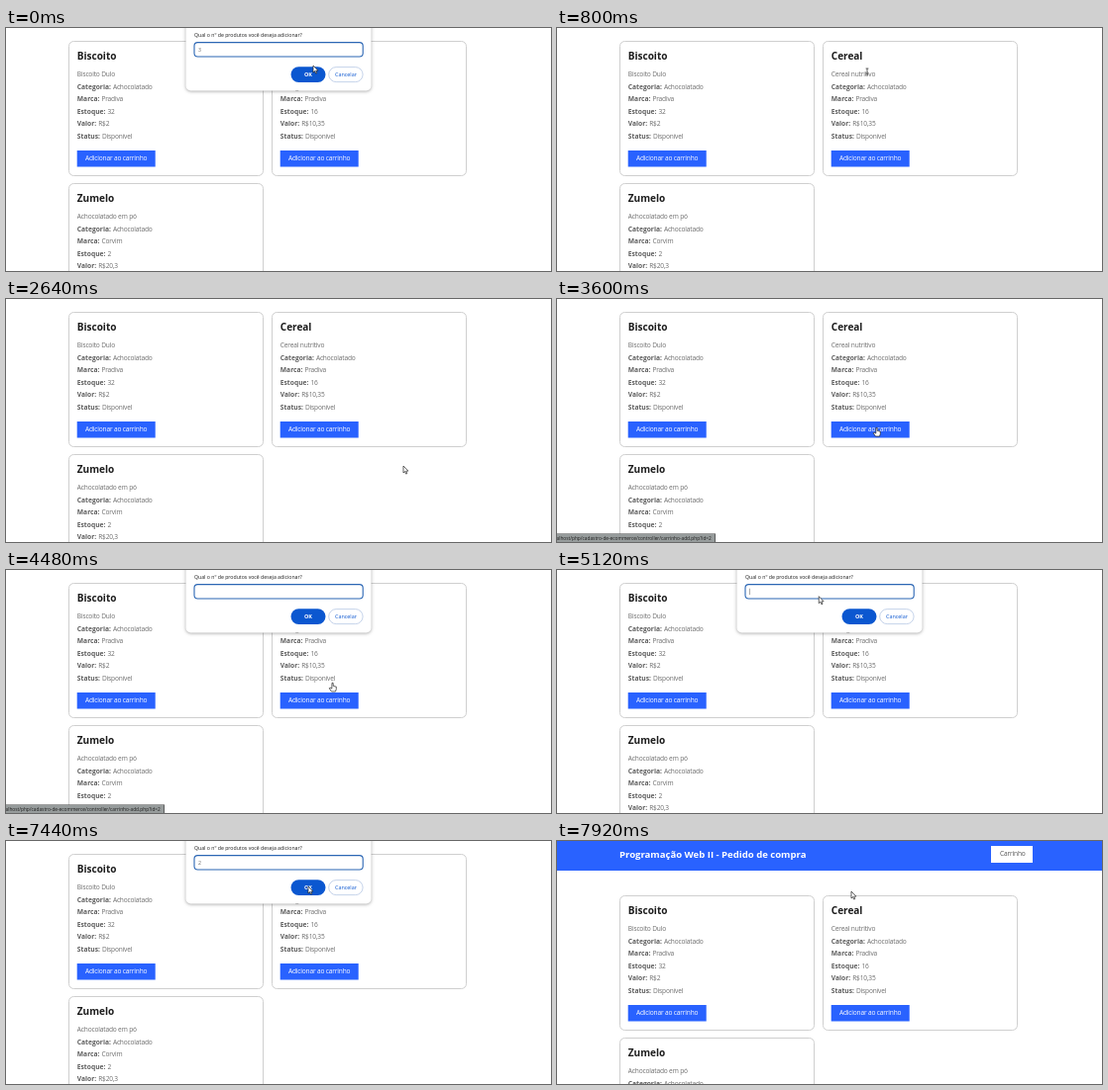
Animation, 550 px wide and 246 px high, one loop 8 s. Source, as an HTML page with a canvas:

```html
<!DOCTYPE html>
<html lang="pt-BR">
<head>
<meta charset="utf-8">
<title>Pedido de compra</title>
<style>
html, body { margin: 0; width: 100%; height: 100%; overflow: hidden; background: #fff; }
canvas { display: block; width: 550px; height: 246px; }
</style>
</head>
<body>
<canvas id="stage"></canvas>
<script>
const W = 550, H = 246, LOOP = 8000;
const BLUE = '#2962ff', ACCENT = '#0b57d0';
const SANS = '"Open Sans", "Noto Sans", sans-serif';
const canvas = document.getElementById('stage');
const ctx = canvas.getContext('2d');
const dpr = window.devicePixelRatio || 1;
canvas.width = W * dpr;
canvas.height = H * dpr;

const products = [
  { x: 63.5, y: 55.5, name: 'Biscoito', info: 'Biscoito Dulo', brand: 'Pradiva', stock: 32, price: 'R$2' },
  { x: 268.5, y: 55.5, name: 'Cereal', info: 'Cereal nutritivo', brand: 'Pradiva', stock: 16, price: 'R$10,35' },
  { x: 63.5, y: 199.5, name: 'Zumelo', info: 'Achocolatado em pó', brand: 'Corvim', stock: 2, price: 'R$20,3' }
];

// time, x, y, pointer shape from this time on
const path = [
  [0, 310, 38, 'arrow'], [170, 310, 38, 'beam'], [700, 313, 44, 'beam'],
  [960, 313, 44, 'arrow'], [1700, 439, 34.5, 'arrow'], [2000, 439, 34.5, 'arrow'],
  [2560, 401, 169, 'arrow'], [2720, 401, 169, 'arrow'], [3060, 334, 138, 'hand'],
  [3400, 322, 130, 'hand'], [3900, 322, 130, 'hand'], [4300, 329, 114, 'hand'],
  [4680, 329, 114, 'arrow'], [5160, 263, 25, 'beam'], [7040, 263, 25, 'arrow'],
  [7400, 305, 46, 'arrow'], [7640, 305, 46, 'arrow'], [7880, 297, 51, 'arrow']
];

function ramp(t, a, b) {
  const p = Math.min(1, Math.max(0, (t - a) / (b - a)));
  return p * p * (3 - 2 * p);
}

function scrollAt(t) {
  if (t < 160) return 42;
  if (t >= 7640) return 0;
  return 42 * (ramp(t, 460, 620) - ramp(t, 1790, 1910) + ramp(t, 2250, 2410));
}

function pointerAt(t) {
  let i = path.length - 1;
  while (path[i][0] > t) i--;
  const a = path[i], b = path[i + 1] || a;
  const k = a === b ? 0 : ramp(t, a[0], b[0]);
  return { x: a[1] + (b[1] - a[1]) * k, y: a[2] + (b[2] - a[2]) * k, shape: a[3] };
}

function text(s, x, y, size, color, { bold = false, align = 'left', gap = 0 } = {}) {
  ctx.font = `${bold ? 700 : 400} ${size}px ${SANS}`;
  ctx.letterSpacing = gap + 'px';
  ctx.textAlign = align;
  ctx.fillStyle = color;
  ctx.fillText(s, x, y);
  return ctx.measureText(s).width;
}

const body = (s, x, y, color = '#6c6c6c') => text(s, x, y, 6.6, color, { gap: -0.17 });

function rect(x, y, w, h, color) {
  ctx.fillStyle = color;
  ctx.fillRect(x, y, w, h);
}

function round(x, y, w, h, r, fill, stroke, line = 1) {
  ctx.beginPath();
  ctx.roundRect(x, y, w, h, r);
  if (fill) { ctx.fillStyle = fill; ctx.fill(); }
  if (stroke) { ctx.strokeStyle = stroke; ctx.lineWidth = line; ctx.stroke(); }
}

function drawCard(p) {
  const x = p.x + 8.3, y = p.y;
  round(p.x, y, 196, 136, 5, '#fff', '#cacaca', 0.9);
  text(p.name, x, y + 18.7, 10, '#1c1c1c', { bold: true });
  body(p.info, x, y + 35.9);
  const rows = [
    ['Categoria:', 'Achocolatado'], ['Marca:', p.brand], ['Estoque:', p.stock],
    ['Valor:', p.price], ['Status:', 'Disponível']
  ];
  rows.forEach(([label, value], i) => {
    const by = y + 48.4 + i * 12.5;
    const w = text(label, x, by, 6.7, '#5e5e5e', { bold: true });
    body(String(value), x + w + 2, by);
  });
  rect(p.x + 8.2, y + 110.5, 79, 16.5, BLUE);
  body('Adicionar ao carrinho', x + 8.1, y + 120.5, '#fff');
}

function drawPage(scroll) {
  rect(0, 0, W, H, '#fff');
  ctx.save();
  ctx.translate(0, -scroll);
  rect(0, 0, W, 30, BLUE);
  text('Programação Web II - Pedido de compra', 63, 17, 9.55, '#fff', { bold: true });
  rect(438, 5, 42, 17, '#fff');
  body('Carrinho', 447, 15.4, '#555');
  products.forEach(drawCard);
  ctx.restore();
}

function drawDialog(t, value) {
  ctx.save();
  ctx.shadowColor = 'rgba(0,0,0,0.36)';
  ctx.shadowBlur = 3.5 * dpr;
  ctx.shadowOffsetY = 0.8 * dpr;
  round(181.5, -10, 187, 73.5, 5, '#fff');
  ctx.restore();
  text('Qual o nº de produtos você deseja adicionar?', 190, 9, 5.2, '#1c1c1c');
  round(190, 14.6, 170.2, 14.4, 3.5, '#fff', '#2b66b4', 1.1);
  if (value) text(value, 194, 23.9, 5.2, '#666');
  else if ((t + 360) % 1060 < 530) rect(194.3, 18.7, 0.5, 6.4, '#555');
  round(287.5, 39.2, 35, 15.8, 7.9, ACCENT);
  text('OK', 305, 49.1, 5.5, '#fff', { bold: true, align: 'center' });
  round(325.7, 39.6, 34.4, 15, 7.5, '#fff', '#b5c7e4', 0.8);
  text('Cancelar', 343, 49, 5.4, ACCENT, { align: 'center' });
}

function drawStatus() {
  rect(0, 237.5, 160, 8.5, '#444');
  rect(0, 238, 159.3, 8, '#979c9c');
  text('alhost/php/cadastro-de-ecommerce/controller/carrinho-add.php?id=2', -0.5, 244, 4.8, '#1e1e1e');
}

function outline(points) {
  ctx.beginPath();
  points.forEach(([x, y]) => ctx.lineTo(x, y));
  ctx.closePath();
  ctx.fill();
  ctx.stroke();
}

const shapes = {
  arrow() {
    outline([[0, 0], [0, 7], [1.6, 5.6], [2.7, 8.1], [3.8, 7.6], [2.7, 5.2], [4.9, 5.1]]);
  },
  hand() {
    outline([[0, 0.3], [1.1, 0.3], [1.3, 3.4], [4.3, 4.2], [4.3, 6.6], [3.5, 9], [-0.5, 9], [-2.8, 5.8], [-2, 5], [-0.2, 6.1]]);
  },
  beam() {
    ctx.beginPath();
    ctx.moveTo(-1.4, -3); ctx.lineTo(1.4, -3);
    ctx.moveTo(0, -3); ctx.lineTo(0, 3);
    ctx.moveTo(-1.4, 3); ctx.lineTo(1.4, 3);
    ctx.stroke();
  }
};

function drawPointer(t, inDialog) {
  const p = pointerAt(t);
  ctx.save();
  ctx.translate(p.x, p.y);
  ctx.fillStyle = '#fff';
  ctx.strokeStyle = p.shape === 'beam' && inDialog ? '#b4b4b4' : '#222';
  ctx.lineWidth = 0.7;
  ctx.lineJoin = 'round';
  shapes[p.shape]();
  ctx.restore();
}

function draw(t) {
  ctx.setTransform(dpr, 0, 0, dpr, 0, 0);
  drawPage(scrollAt(t));
  const first = t < 160;
  const open = first || (t >= 3960 && t < 7600);
  if (open) drawDialog(t, first ? '3' : t >= 6300 ? '2' : '');
  if (t >= 3060 && t < 4720) drawStatus();
  drawPointer(t, open);
}

const start = performance.now();
function tick() {
  draw((performance.now() - start) % LOOP);
  requestAnimationFrame(tick);
}
tick();
</script>
</body>
</html>
```
